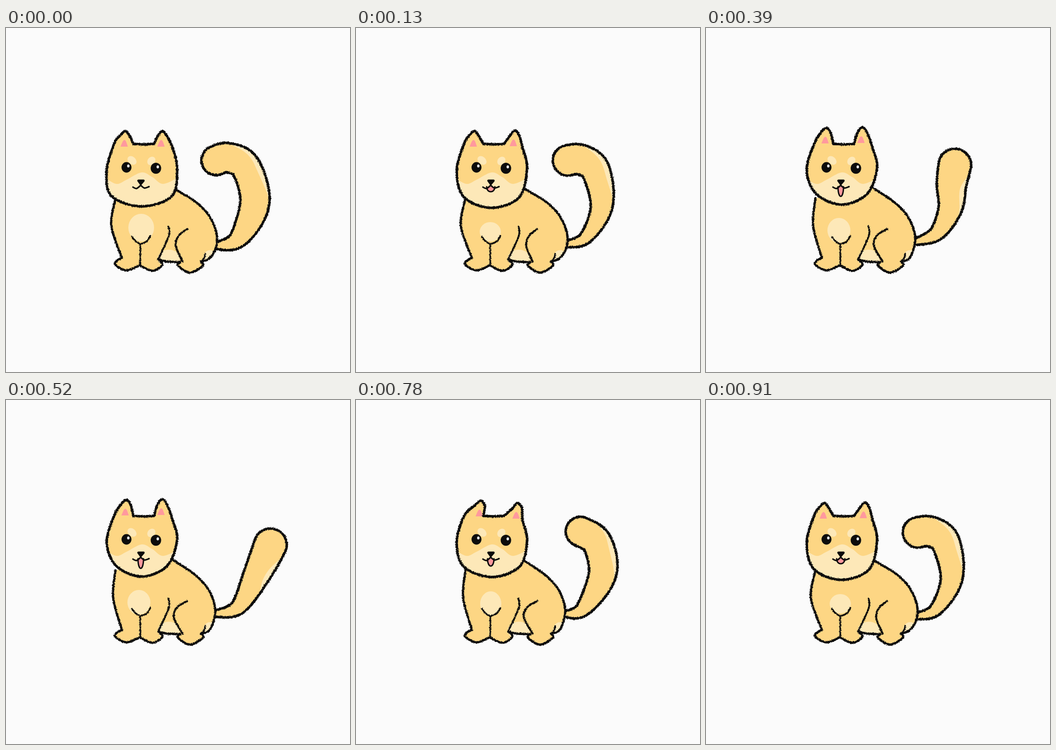
Recreate the animation shown at these times as an HTML page. Size 748x748 px, loop 1.04 s.

```html
<!DOCTYPE html>
<html lang="en">
<head>
<meta charset="utf-8">
<title>Wagging dog</title>
<style>
  html, body { margin: 0; width: 100%; height: 100%; overflow: hidden; background: #fbfbfb; }
  svg { display: block; width: 100%; height: 100%; }
  .ink { fill: none; stroke: #0c0c0c; stroke-linecap: round; stroke-linejoin: round; }
</style>
</head>
<body>
<svg id="stage" viewBox="0 0 748 748"></svg>
<script>
const FUR = '#fdd684', CREAM = '#fde8b8', PINK = '#ff999d', INK = '#0c0c0c';
const STEP = 130, ORDER = [0, 1, 2, 3, 4, 3, 2, 1];

// ears: tips; jaw: half width and bottom; rump: right edge of the body;
// tongue: half width and length; girth: how fast the tail widens, and its tip radius.
const happy = {
  ears: [[262, 217], [340, 216]], jaw: [55, 384], rump: 455, chest: [289, 440, 25, 27],
  tongue: [6, 21], girth: [.8, 37], spine: '456 465 502 446 531 392 534 340 541 298'
};
const poses = [
  { ears: [[260, 224], [340, 224]], jaw: [66, 388], rump: 459, chest: [294, 434, 28, 30],
    tongue: [0, 0], girth: [1.9, 32], spine: '457 474 505 458 541 380 521 302 482 282 457 288' },
  { ears: [[258, 224], [345, 223]], jaw: [60, 391], rump: 460, chest: [292, 443, 23, 21],
    tongue: [9, 11], girth: [1, 33], spine: '459 470 500 455 534 388 521 310 488 286 461 288' },
  { ears: [[271, 219], [351, 224]], jaw: [61, 385], rump: 455, chest: [293, 443, 23, 27],
    tongue: [7, 16], girth: [1.4, 32], spine: '456 466 495 453 536 378 524 310 488 286' },
  happy,
  { ...happy, spine: '456 465 505 450 545 380 575 315' }
];

// Smooth curve through "x y x y ..."; "|" marks a sharp corner.
function curve(text) {
  let d = '', last = null;
  for (const chunk of text.split('|')) {
    const n = chunk.trim().split(/\s+/).map(Number), p = last ? [last] : [];
    for (let i = 0; i < n.length; i += 2) p.push([n[i], n[i + 1]]);
    if (!last) d = 'M' + p[0];
    for (let i = 0; i < p.length - 1; i++) {
      const a = p[i], b = p[i + 1], before = p[i - 1] || a, after = p[i + 2] || b;
      const c1 = a.map((v, k) => v + (b[k] - before[k]) / 6);
      const c2 = b.map((v, k) => v - (after[k] - a[k]) / 6);
      d += `C${c1} ${c2} ${b}`;
    }
    last = p[p.length - 1];
  }
  return d;
}

const fill = (d, color, extra = '') => `<path d="${d}" fill="${color}" ${extra}/>`;
const line = (d, width) => `<path class="ink" d="${d}" stroke-width="${width}"/>`;
const oval = (x, y, rx, ry, color, turn = 0) =>
  `<ellipse cx="${x}" cy="${y}" rx="${rx}" ry="${ry}" fill="${color}" transform="rotate(${turn} ${x} ${y})"/>`;

function headPath({ ears: [[lx, ly], [rx, ry]], jaw: [half, bottom] }) {
  return curve(`277 252 300 253 322 252|${rx - 11} ${ry + 12} ${rx} ${ry} ${rx + 10} ${ry + 11}
    362 260 372 305 ${295 + half} ${bottom - 23} 295 ${bottom} ${295 - half} ${bottom - 23}
    219 310 235 252 ${lx - 12} ${ly + 10} ${lx} ${ly} ${lx + 9} ${ly + 11} 277 252`);
}

const bodyPath = r => curve(`238 370 ${688 - r} 430 252 500|241 506 238 515 262 527 291 516|
  318 528 340 515 331 503|350 508 379 509|374 517 400 532 428 517 424 508|
  441 502 ${r - 4} 482 ${r} 456 ${r - 7} 428 ${r - 22} 402 ${r - 48} 377 362 347`);

// A ribbon of growing width around the spine, with a round tip and a pale outer band.
function tailPaths({ spine, girth: [growth, tip] }) {
  const path = document.createElementNS('http://www.w3.org/2000/svg', 'path');
  path.setAttribute('d', curve(spine));
  const length = path.getTotalLength(), steps = 40;
  const left = [], right = [], bandOut = [], bandIn = [];
  let radius;
  for (let i = 0; i <= steps; i++) {
    const t = i / steps, s = t * length;
    const a = path.getPointAtLength(s - 1), b = path.getPointAtLength(s + 1), c = path.getPointAtLength(s);
    const angle = Math.atan2(b.y - a.y, b.x - a.x) + Math.PI / 2;
    const side = k => [c.x + k * Math.cos(angle), c.y + k * Math.sin(angle)];
    radius = 7 + (tip - 7) * Math.sin(Math.PI / 2 * Math.min(1, growth * t));
    left.push(side(-radius));
    right.unshift(side(radius));
    if (t >= .48 && t <= .93) {
      bandOut.push(side(radius));
      bandIn.unshift(side(radius - 13 * Math.sin(Math.PI * (t - .48) / .45)));
    }
  }
  return [`M${left.join('L')}A${radius} ${radius} 0 0 1 ${right.join('L')}`,
          `M${bandOut.concat(bandIn).join('L')}Z`];
}

function drawDog(pose, i) {
  const { ears, rump, chest, tongue: [w, drop] } = pose;
  const head = headPath(pose), body = bodyPath(rump), [tail, band] = tailPaths(pose);
  const clip = (id, d) => `<clipPath id="${id}${i}"><path d="${d}"/></clipPath>`;
  const rough = art => `<g filter="url(#rough${i})">${art}</g>`;
  const pinkEar = ([x, y]) => fill(curve(
    `${x - 11} ${y + 34} ${x - 5} ${y + 21} ${x} ${y + 21} ${x + 5} ${y + 34}|${x - 11} ${y + 34}`), PINK);
  const eye = (x, y, r) => oval(x, y, r, r + .6, INK) + oval(x + 4, y - 3, 2.6, 3.2, '#fbfbfb');
  const lick = `M${293 - w} 345C${293 - w} ${345 + 1.33 * drop} ${293 + w} ${345 + 1.33 * drop} ${293 + w} 345`;
  const k = rump - 455;

  return `<g class="pose" visibility="hidden">
    <filter id="rough${i}" filterUnits="userSpaceOnUse" x="190" y="190" width="450" height="370" color-interpolation-filters="sRGB">
      <feTurbulence type="fractalNoise" baseFrequency=".45" numOctaves="2" seed="${i + 3}"/>
      <feDisplacementMap in="SourceGraphic" scale="4.5" xChannelSelector="R" yChannelSelector="G"/>
    </filter>
    ${clip('head', head)}${clip('body', body)}
    ${fill(tail, FUR)}${fill(band, CREAM)}${rough(line(tail, 5.6))}
    ${fill(body, FUR)}
    <g clip-path="url(#body${i})">${oval(354, 501, 24, 19, CREAM)}${oval(444, 500, 15, 17, CREAM)}</g>
    ${oval(...chest, CREAM)}
    ${rough(line(body, 5) +
      line(curve('274 454 282 464 292 470|306 464 314 452'), 3.6) +
      line('M292 470V517', 3.6) +
      line(curve('353 431 354 452 331 503'), 4) +
      line(curve(`394 437 ${372 + k} 451 ${365 + k} 473 384 508`), 4.4) +
      line('M433 491Q433 500 426 506', 3.6))}
    ${fill(head, FUR)}
    ${fill(curve('215 325 240 339 262 330 295 314 318 324 342 339 380 322|380 400|215 400'), CREAM, `clip-path="url(#head${i})"`)}
    ${ears.map(pinkEar).join('')}
    ${oval(274, 288, 11, 8, CREAM, 42)}${oval(316, 289, 10, 8, CREAM, -50)}
    ${rough(line(head, 5.6))}
    ${drop ? fill(lick, PINK) + line(lick, 3) : ''}
    ${line(curve('276 346 284 349 293 342|301 348 311 345'), 3.4)}
    <path d="M288 332h11l-6 7z" fill="${INK}" stroke="${INK}" stroke-width="5" stroke-linejoin="round"/>
    ${eye(262, 303, 10.8)}${eye(326, 305, 11.4)}
  </g>`;
}

const stage = document.getElementById('stage');
stage.innerHTML = poses.map(drawDog).join('');
const groups = [...stage.querySelectorAll('.pose')];
const start = performance.now();

function tick() {
  const shown = ORDER[Math.floor((performance.now() - start) / STEP) % ORDER.length];
  groups.forEach((g, i) => g.setAttribute('visibility', i === shown ? 'visible' : 'hidden'));
  requestAnimationFrame(tick);
}
tick();
</script>
</body>
</html>
```
